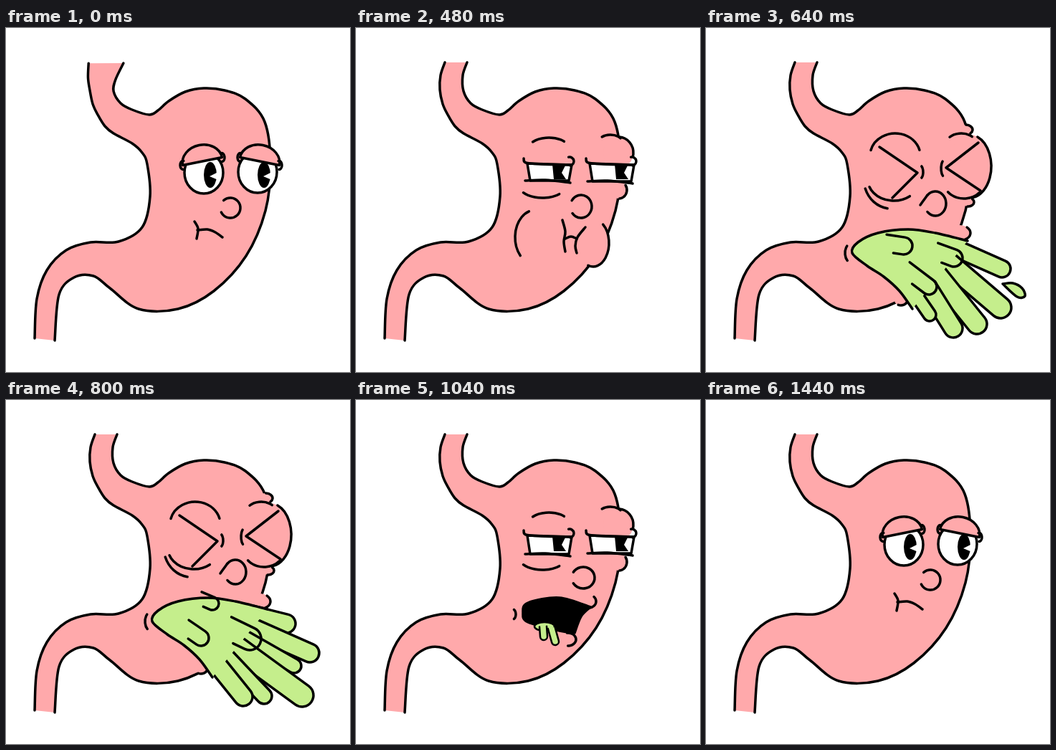
An HTML page with a canvas for the animation above (1.52 s loop, 480x480 px).

```html
<!DOCTYPE html>
<html lang="en">
<head>
<meta charset="utf-8">
<title>Queasy stomach</title>
<style>
  html, body { margin: 0; width: 100%; height: 100%; overflow: hidden; background: #fff; }
  canvas { display: block; width: 100vw; height: 100vh; }
</style>
</head>
<body>
<canvas id="stage" width="480" height="480"></canvas>
<script>
const ctx = document.getElementById('stage').getContext('2d');
const PINK = '#ffa9ab', GREEN = '#c5ee8c', BLACK = '#000', WHITE = '#fff';
const STEP = 80, LOOP = 1520, TURN = Math.PI * 2;

const points = text => text.split(' ').map(p => p.split(',').map(Number));

// Smooth curve through a few key points.
function curve(path, pts, joined) {
  path[joined ? 'lineTo' : 'moveTo'](...pts[0]);
  for (let i = 0; i < pts.length - 1; i++) {
    const b = pts[i], c = pts[i + 1];
    const a = pts[i - 1] || b, d = pts[i + 2] || c;
    path.bezierCurveTo(
      b[0] + (c[0] - a[0]) / 6, b[1] + (c[1] - a[1]) / 6,
      c[0] - (d[0] - b[0]) / 6, c[1] - (d[1] - b[1]) / 6, ...c);
  }
  return path;
}

function paint(path, fill, outlined = true) {
  if (fill) {
    ctx.fillStyle = fill;
    ctx.fill(path);
  }
  if (outlined) ctx.stroke(path);
}

const stroke = text => paint(curve(new Path2D(), points(text)));
const polygon = (text, fill, outlined) => paint(new Path2D(`M${text}Z`), fill, outlined);
const chevron = text => paint(new Path2D(`M${text}`));

function oval(x, y, rx, ry, fill, outlined) {
  const path = new Path2D();
  path.ellipse(x, y, rx, ry, 0, 0, TURN);
  paint(path, fill, outlined);
}

function arc(x, y, rx, ry, from, to) {
  const path = new Path2D();
  path.ellipse(x, y, rx, ry, 0, from, to);
  paint(path);
}

// A bulge that hides the outline below it and shows only part of its own.
function lump(x, y, rx, ry, from, to) {
  oval(x, y, rx, ry, PINK, false);
  arc(x, y, rx, ry, from, to);
}

// Rounded tongue with its round end at x,y and an open root.
function drip(x, y, r, angle, length, fill) {
  const path = new Path2D();
  path.moveTo(-length, -r);
  path.arc(0, 0, r, -TURN / 4, TURN / 4);
  path.lineTo(fill ? -length : -length / 2, r);
  ctx.save();
  ctx.translate(x, y);
  ctx.rotate(angle);
  paint(path, fill);
  ctx.restore();
}

const WALLS = {
  outer: points('190,174 176,161 150,147 138,137 128,121 121,106 117,86 118,66 124,48'),
  inner: points('155,48 149,66 150,88 160,105 176,114 200,121 212,115'),
};
const BACK = points('40,433 43,378 57,338 84,310 118,299 157,298 190,278 201,235 197,190');
const FRONT = points('227,102 250,89 276,84 305,87 334,99 361,131 369,190 362,255 335,318 ' +
  '290,367 240,392 185,392 145,363 122,346 95,348 74,372 68,436');

// A swallowed lump slides down the gullet and pushes both walls apart.
function swell(wall, step) {
  if (step > 4) return wall;
  const gx = 138 - 7 * step + 4.5 * step ** 2;
  const gy = 46 + 29 * step - 1.2 * step ** 2;
  return wall.map(([x, y]) => {
    const dist = Math.hypot(x - gx, y - gy);
    const push = 9 * Math.exp(-(((dist - 16) / 16) ** 2)) / dist;
    return [x + (x - gx) * push, y + (y - gy) * push];
  });
}

function body(step) {
  const back = [...BACK, ...swell(WALLS.outer, step)];
  const front = [...swell(WALLS.inner, step), ...FRONT];
  paint(curve(curve(new Path2D(), back), front, true), PINK, false);
  paint(curve(curve(new Path2D(), back), front));
}

function roundEye(x, y, lidX, tilt) {
  oval(x, y, 27, 29, WHITE);
  const px = x + 9, py = 205;
  oval(px, py, 9, 18, BLACK, false);
  polygon(`${px - 1},${py + 2} ${px + 11},${py - 4} ${px + 11},${py + 7}`, WHITE, false);
  const lid = new Path2D();
  lid.ellipse(lidX, 186, 28, 23, tilt, TURN / 2, TURN);
  lid.closePath();
  paint(lid, PINK);
  for (const side of [-1, 1]) {
    const hx = lidX + side * 27, hy = 186 + side * 27 * tilt;
    arc(hx, hy, 4, 6, side < 0 ? 1.5 : -1.8, side < 0 ? 4.9 : 1.6);
  }
}

function calm() {
  roundEye(276, 202, 274, -0.2);
  roundEye(351, 201, 354, 0.2);
  arc(313, 251, 14, 14, -2.3, 2.7);
  stroke('263,270 268,280 266,294');
  stroke('267,282 281,281 292,285 302,292');
}

function squintEye(x, bottom) {
  polygon(`${x},189 ${x + 62},191 ${x + 58},${bottom} ${x + 4},${bottom}`, WHITE);
  polygon(`${x + 35},190 ${x + 54},190 ${x + 48},202 ${x + 54},211 ${x + 37},211`, BLACK, false);
  stroke(`${x - 5},182 ${x - 2},188 ${x + 20},190 ${x + 62},191`);
  arc(x + 59, 186, 6, 6, -1.8, 1.4);
  stroke(`${x - 3},${bottom} ${x + 25},${bottom - 1} ${x + 60},${bottom + 3}`);
}

function tiredEyes(droop) {
  lump(366, 174, 21, 22, -1.5, 0.2);
  lump(367, 226, 11, 12, -0.6, 1.5);
  squintEye(239, 213 + droop / 2);
  squintEye(326, 214);
  arc(269, 168 + droop, 28, 15, -2.5, -0.7);
  arc(355, 158, 16, 9, -2.4, -0.5);
  arc(260, 222, 31, 15, 0.7, 2.6);
}

function queasy() {
  lump(331, 300, 22, 33, -0.9, 1.9);
  tiredEyes(0);
  arc(314, 249, 15, 16, -2.6, 2.5);
  arc(250, 292, 28, 38, 2.4, 4.4);
  stroke('288,268 292,284 290,298 292,312');
  stroke('320,278 309,292 306,304 308,314');
  stroke('292,294 300,291 308,294');
}

function drained() {
  tiredEyes(4);
  arc(317, 248, 16, 15, -2.6, 2.6);
  arc(219, 299, 4, 7, -1.2, 1.2);
  const mouth = curve(new Path2D(),
    points('305,325 284,322 240,310 233,297 240,283 284,276 327,289'));
  curve(mouth, points('327,289 314,302 305,325'), true);
  paint(mouth, BLACK);
  arc(325, 281, 10, 9, -0.8, 1.5);
  arc(296, 334, 11, 9, -1.7, 1.6);
  ctx.lineWidth = 2.5;
  oval(263, 316, 14, 6, GREEN);
  drip(262, 330, 5, 1.5, 14, GREEN);
  drip(278, 337, 5, 1.3, 20, GREEN);
}

// Tongues hold a tip x, y and radius; folds add an angle and a length.
const SPEWS = [
  {
    tongues: [[413, 336, 12], [411, 390, 15], [378, 413, 14], [345, 419, 13], [312, 400, 9]],
    folds: [[276, 304, 12, 0.15, 26], [311, 361, 11, 0.65, 42], [346, 321, 12, 0.35, 28]],
  },
  {
    tongues: [[391, 317, 13], [424, 358, 13], [402, 376, 10], [413, 417, 16], [360, 418, 11], [331, 419, 13]],
    folds: [[288, 289, 9, 0.4, 20], [272, 337, 11, 0.6, 28], [340, 338, 16, 0.45, 36]],
  },
];

function spew({ tongues, folds }) {
  const last = tongues.length - 1;
  tongues.forEach(([x, y, r], i) => {
    const rootX = 343 - 53 * i / last, rootY = 305 + 63 * i / last;
    drip(x, y, r, Math.atan2(y - rootY, x - rootX), Math.hypot(x - rootX, y - rootY), GREEN);
  });
  paint(curve(new Path2D(),
    points('365,297 320,286 282,281 240,286 212,299 204,314 225,332 248,347 270,367 288,392')), GREEN);
  folds.forEach(fold => drip(...fold));
}

function heave(kind) {
  ctx.save();
  ctx.translate(0, kind * -5);
  lump(362, 142, 10, 7, -1.5, 0.8);
  lump(366, 243, 8, 6, -0.8, 1.7);
  lump(353, 286, 16, 11, -0.8, 1.5);
  lump(272, 380, 9, 7, -0.5, 2);
  lump(368, 193, 30, 44, -1.2, 1.4);
  arc(264, 178, 35, 31, -2.9, -0.25);
  arc(356, 160, 20, 13, -2.5, -0.7);
  chevron('242,166 295,202 260,237');
  chevron('380,160 335,195 383,227');
  arc(299, 201, 4, 9, -1.1, 1.1);
  arc(333, 196, 5, 12, 2.1, 4.1);
  arc(262, 212, 36, 29, 0.9, 2.8);
  arc(258, 210, 38, 42, 1.7, 2.8);
  arc(360, 215, 28, 23, 0.7, 2.5);
  arc(320, 245, 15, 17, -2.4, 2.4);
  stroke('299,247 304,240 309,233');
  arc(202, 314, 8, 13, 2.2, 4);
  spew(SPEWS[kind]);
  if (!kind) {
    const drop = curve(new Path2D(), points('414,357 428,356 441,363 445,374 434,375 414,357'));
    paint(drop, GREEN);
  }
  ctx.restore();
}

function face(step) {
  if (step < 5 || step > 13) calm();
  else if (step < 7) queasy();
  else if (step < 12) heave(step % 3 === 1 ? 1 : 0);
  else drained();
}

function draw(now) {
  const step = Math.floor((now % LOOP) / STEP);
  ctx.fillStyle = WHITE;
  ctx.fillRect(0, 0, 480, 480);
  ctx.lineWidth = 3.5;
  ctx.lineCap = ctx.lineJoin = 'round';
  ctx.strokeStyle = BLACK;
  body(step);
  face(step);
}

const start = performance.now();
function tick() {
  draw(performance.now() - start);
  requestAnimationFrame(tick);
}
tick();
</script>
</body>
</html>
```
